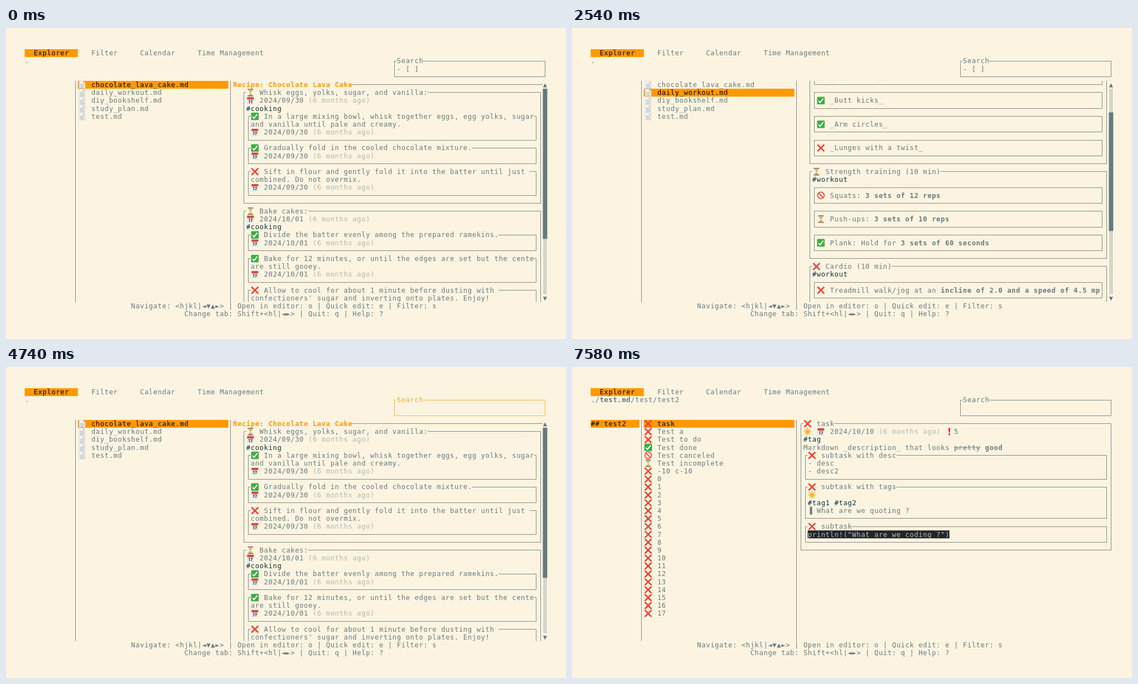
Write an HTML page with a canvas that moves like this. It is 1004 px wide and 558 px high and loops after 8 s.

```html
<!DOCTYPE html>
<html lang="en">
<head>
<meta charset="utf-8">
<title>Task explorer</title>
<style>
html, body { margin: 0; width: 100%; height: 100%; overflow: hidden; background: #fcf4e0; }
canvas { display: block; }
</style>
</head>
<body>
<canvas id="stage" width="1004" height="558"></canvas>
<script>
const ctx = document.getElementById('stage').getContext('2d');
const LOOP = 8000;
const CW = 7.94, CH = 14.18, X0 = 33.5, Y0 = 38;
const TOP = 4, ROWS = 28, BAR = 117;
const BG = '#fcf4e0', FG = '#657b83', DIM = '#b1b8b2', DARK = '#073642', ORANGE = '#ff9900';

const X = col => X0 + col * CW;
const Y = row => Y0 + row * CH;

function fill(color, x, y, w, h) {
  ctx.fillStyle = color;
  ctx.fillRect(x, y, w, h);
}

function poly(color, points, width) {
  ctx.beginPath();
  for (let i = 0; i < points.length; i += 2) ctx.lineTo(points[i], points[i + 1]);
  if (width) {
    ctx.strokeStyle = color;
    ctx.lineWidth = width;
    ctx.stroke();
  } else {
    ctx.fillStyle = color;
    ctx.fill();
  }
}

function disc(color, x, y, r, width) {
  ctx.beginPath();
  ctx.arc(x, y, r, 0, 7);
  ctx.fillStyle = ctx.strokeStyle = color;
  ctx.lineWidth = width;
  width ? ctx.stroke() : ctx.fill();
}

// Two-cell icons, each drawn in a 14 by 14 box
const ICONS = {
  '✅'() {
    ctx.beginPath();
    ctx.roundRect(0.2, 0.2, 13.6, 13.6, 1.5);
    ctx.fillStyle = '#3fae49';
    ctx.fill();
    poly('#fff', [2.8, 7.6, 5.5, 10.6, 11.3, 3.2], 1.9);
  },
  '❌'() {
    poly('#f0443a', [1, 1, 13, 13], 2.7);
    poly('#f0443a', [13, 1, 1, 13], 2.7);
  },
  '⏳'() {
    poly('#cfd6cf', [3.2, 1.5, 10.8, 1.5, 10.3, 4.5, 7.8, 7, 10.3, 9.5, 10.8, 12.5, 3.2, 12.5, 3.7, 9.5, 6.2, 7, 3.7, 4.5]);
    poly('#e2a640', [4, 3.5, 10, 3.5, 7, 7]);
    poly('#e2a640', [7, 8.5, 10.3, 12.5, 3.7, 12.5]);
    fill('#8a7350', 2, 0.3, 10, 1.7);
    fill('#8a7350', 2, 12, 10, 1.7);
  },
  '🚫'() {
    disc('#e5453d', 7, 7, 5.9, 1.7);
    poly('#e5453d', [2.8, 2.8, 11.2, 11.2], 1.7);
  },
  '📅'() {
    fill('#e3e5e6', 1, 1, 12, 12.5);
    fill('#d8423a', 1, 1, 12, 4);
    poly('#37474f', [4, 7.2, 5.2, 6.6, 5.2, 12], 1.2);
    poly('#37474f', [7, 7, 10, 7, 8.2, 12], 1.2);
  },
  '📄'() {
    poly('#c3c8c9', [1.3, 0.2, 9, 0.2, 12.7, 3.8, 12.7, 13.8, 1.3, 13.8]);
    poly('#f2f4f4', [1.8, 0.7, 8.8, 0.7, 12.2, 4, 12.2, 13.3, 1.8, 13.3]);
    poly('#b4bcbf', [8.8, 0.7, 12.2, 4, 8.8, 4]);
    for (let y = 5.5; y < 12.5; y += 1.7) fill('#a9b1b4', 3.2, y, 7.6, 0.7);
  },
  '☀'() {
    for (let a = 0; a < 8; a++) {
      const c = Math.cos(a * Math.PI / 4), s = Math.sin(a * Math.PI / 4);
      poly('#f5a623', [7 + 5 * c, 7 + 5 * s, 7 + 7 * c, 7 + 7 * s], 1.6);
    }
    disc('#fbb52d', 7, 7, 4.3);
  },
  '❗'() {
    poly('#e5392f', [5, 0.5, 9, 0.5, 8, 9, 6, 9]);
    disc('#e5392f', 7, 11.8, 1.7);
  }
};

const TOKEN = /\*\*.+?\*\*|~~.+?~~|`.+?`|#\w+|\(6 months ago\)|./gu;

// Writes marked-up text on the cell grid and returns the column after it
function put(col, row, text, { color = FG, bold = false, end = 118 } = {}) {
  for (const token of text.match(TOKEN) || []) {
    let style = color, body = token, heavy = bold, strike = false;
    if (token.length > 4 && token.startsWith('**')) { body = token.slice(2, -2); heavy = true; }
    else if (token.length > 4 && token.startsWith('~~')) { body = token.slice(2, -2); strike = true; }
    else if (token.length > 2 && token[0] === '`') {
      body = token.slice(1, -1);
      style = '#b9bbb6';
      fill('#222629', X(col), Y(row), body.length * CW, CH);
    }
    else if (/^#\w/.test(token)) style = DARK;
    else if (token[0] === '(' && token.length > 1) style = DIM;

    if (strike) fill(style, X(col), Y(row) + 7.2, body.length * CW, 0.9);
    ctx.font = `${heavy ? 'bold ' : ''}12.18px "DejaVu Sans Mono", monospace`;
    for (const ch of body) {
      if (col >= end) return col;
      if (ICONS[ch]) {
        ctx.save();
        ctx.translate(X(col) + 0.8, Y(row) + 0.1);
        ICONS[ch]();
        ctx.restore();
        col += 2;
        continue;
      }
      if (ch === '▐') fill(FG, X(col + 0.5), Y(row), CW / 2, CH);
      else {
        ctx.fillStyle = style;
        ctx.fillText(ch, X(col) + 0.3, Y(row) + 11.3);
      }
      col++;
    }
  }
  return col;
}

const LINE = 0.85;
const hLine = (from, to, row, color = FG) =>
  fill(color, X(from), Math.floor(Y(row + 0.5)), (to - from) * CW, LINE);
const vLine = (col, from, to, color = FG) =>
  fill(color, Math.floor(X(col + 0.5)), Y(from), LINE, (to - from) * CH);

function box(left, right, top, bottom, title = '', color = FG) {
  const end = put(left + 1, top, title, { color, end: right });
  hLine(left + 0.5, left + 1, top, color);
  hLine(end, right + 0.5, top, color);
  hLine(left + 0.5, right + 0.5, bottom, color);
  vLine(left, top + 0.5, bottom + 0.5, color);
  vLine(right, top + 0.5, bottom + 0.5, color);
}

const task = (head, lines = [], kids = []) => ({ head, lines, kids });

// Draws a task with its subtasks and returns the row below it
function drawTask({ head, lines, kids }, left, right, top) {
  if (!lines.length && !kids.length) {
    box(left, right, top, top + 2);
    put(left + 1, top + 1, head, { end: right });
    return top + 3;
  }
  let row = top + 1;
  for (const line of lines) put(left + 1, row++, line, { end: right });
  for (const kid of kids) row = drawTask(kid, left + 1, right - 1, row);
  box(left, right, top, row, head);
  return row + 1;
}

function drawTitle(title, col, row) {
  const end = put(col, row, title, { color: ORANGE, bold: true });
  hLine(end, BAR, row);
}

const date = day => `📅 2024/${day} (6 months ago)`;
const SEP30 = date('09/30'), OCT1 = date('10/01');

const cake = {
  titles: ['Recipe: Chocolate Lava Cake'], size: 37,
  tasks: [
    task('⏳ Whisk eggs, yolks, sugar, and vanilla:', [SEP30, '#cooking'], [
      task('✅ In a large mixing bowl, whisk together eggs, egg yolks, sugar', ['and vanilla until pale and creamy.', SEP30]),
      task('✅ Gradually fold in the cooled chocolate mixture.', [SEP30]),
      task('❌ Sift in flour and gently fold it into the batter until just ', ['combined. Do not overmix.', SEP30])
    ]),
    task('⏳ Bake cakes:', [OCT1, '#cooking'], [
      task('✅ Divide the batter evenly among the prepared ramekins.', [OCT1]),
      task('✅ Bake for 12 minutes, or until the edges are set but the cente', ['are still gooey.', OCT1]),
      task('❌ Allow to cool for about 1 minute before dusting with ', ["confectioners' sugar and inverting onto plates. Enjoy!", OCT1])
    ])
  ]
};

const workout = {
  titles: ['Fitness: Daily Workout Plan (30 minutes)'], size: 58,
  tasks: [
    task('❌ Warm up (5 min): Light jogging, jumping jacks, and dynamic ', ['stretches', '#workout'],
      ['✅ _High knees_', '✅ _Butt kicks_', '✅ _Arm circles_', '❌ _Lunges with a twist_'].map(s => task(s))),
    task('⏳ Strength training (10 min)', ['#workout'], [
      task('🚫 Squats: **3 sets of 12 reps**'),
      task('⏳ Push-ups: **3 sets of 10 reps**'),
      task('✅ Plank: Hold for **3 sets of 60 seconds**')
    ]),
    task('❌ Cardio (10 min)', ['#workout'], [
      task('❌ Treadmill walk/jog at an **incline of 2.0 and a speed of 4.5 mp**'),
      task('❌ Stationary bike: Pedal at a moderate resistance **for 10 minute**')
    ])
  ]
};

const test = {
  titles: ['test', 'test2'], size: 88,
  tasks: [
    task('❌ task', [`☀ ${date('10/10')} ❗5`, '#tag', 'Markdown _description_ that looks ~~pretty~~ **good**'], [
      task('❌ subtask with desc', ['- desc', '- desc2']),
      task('❌ subtask with tags', ['☀', '#tag1 #tag2', '▐ What are we quoting ?']),
      task('❌ subtask', ['`println!("What are we coding ?")`'])
    ]),
    task('❌ Test a', [], [task('❌ Test b', [], [task('❌ Test c')])]),
    task('❌ Test to do'),
    task('✅ Test done'),
    task('🚫 Test canceled')
  ]
};

const docs = [cake, workout,
  { titles: ['DIY Bookshelf'], size: 58, tasks: [] },
  { titles: ['Study Plan'], size: 58, tasks: [] },
  test];

const files = ['chocolate_lava_cake', 'daily_workout', 'diy_bookshelf', 'study_plan', 'test'].map(s => `📄 ${s}.md`);
const entries = [
  ...test.tasks.map(t => t.head), '⏳ Test incomplete', '❌ -10 c-10',
  ...Array.from({ length: 18 }, (_, i) => `❌ ${i}`)
];

function list(items, selected, from, to) {
  items.forEach((item, i) => {
    const on = i === selected;
    if (on) fill(ORANGE, X(from), Y(TOP + i), (to - from) * CW, CH);
    put(from, TOP + i, item, { color: on ? '#000' : FG, end: to });
  });
}

function scrollbar(pos, size) {
  const track = ROWS - 2;
  const start = Math.round(pos * track / size);
  const end = Math.round((pos + 27) * track / size);
  put(BAR, TOP, '▲');
  put(BAR, TOP + ROWS - 1, '▼');
  for (const side of [-0.2, 0.2]) {
    fill(FG, X(BAR + 0.5 + side) - 0.4, Y(TOP + 1), 0.8, track * CH);
  }
  fill(FG, X(BAR), Y(TOP + 1 + start), CW, (end - start) * CH);
}

function preview({ titles, tasks }, size, scroll = 0) {
  let row = TOP - scroll, col = 47;
  for (const title of titles) {
    drawTitle(title, col, row++);
    col += 2;
  }
  for (const t of tasks) if (row < TOP + ROWS) row = drawTask(t, col, BAR - 1, row);
  scrollbar(scroll, size);
}

function fileAt(t) {
  if (t < 500) return 0;
  if (t < 4430) return 1;
  if (t < 6060) return 0;
  return Math.min(4, 1 + Math.floor((t - 6060) / 50));
}

function frameParts(t) {
  put(24, 32, 'Navigate: <hjkl|◄▼▲►> | Open in editor: o | Quick edit: e | Filter: s');
  put(36, 33, 'Change tab: Shift+<hl|◄►> | Quit: q | Help: ?');
  fill(ORANGE, X(0), Y(0), 12 * CW, CH);
  put(2, 0, 'Explorer', { color: '#000' });
  put(15, 0, 'Filter');
  put(26, 0, 'Calendar');
  put(39, 0, 'Time Management');

  const focused = t >= 4380 && t < 4780;
  const erased = Math.min(5, Math.max(0, Math.floor((t - 4380) / 50)));
  box(83, 117, 1, 3, 'Search', focused ? '#f3ab30' : FG);
  put(84, 2, '- [ ]'.slice(0, 5 - erased));
  vLine(11, TOP, TOP + ROWS);
  vLine(46, TOP, TOP + ROWS);
}

function draw(t) {
  fill(BG, 0, 0, 1004, 558);
  frameParts(t);
  ctx.save();
  ctx.beginPath();
  ctx.rect(0, Y(TOP), 1004, ROWS * CH);
  ctx.clip();
  let path = '.';
  if (t < 6260) {
    const i = fileAt(t), filtered = t < 4430;
    const scroll = filtered && t >= 1540 ? Math.min(9, 1 + Math.floor((t - 1540) / 200)) : 0;
    list(files, i, 12, 46);
    preview(docs[i], filtered && i === 1 ? 48 : docs[i].size, scroll);
  } else if (t < 6900) {
    path = './**test.md**';
    list(files, 4, 0, 11);
    list(['# test'], 0, 12, 46);
    preview({ titles: ['test2'], tasks: test.tasks }, test.size);
  } else if (t < 7580) {
    path = './**test.md**/test';
    list(['# test'], 0, 0, 11);
    list(['## test2'], 0, 12, 46);
    preview({ titles: [], tasks: test.tasks }, test.size);
  } else {
    path = './**test.md**/test/test2';
    list(['## test2'], 0, 0, 11);
    list(entries, 0, 12, 46);
    drawTask(test.tasks[0], 47, 117, TOP);
  }
  ctx.restore();
  put(0, 1, path);
}

const began = performance.now();
function tick() {
  draw((performance.now() - began) % LOOP);
  requestAnimationFrame(tick);
}
tick();
</script>
</body>
</html>
```
